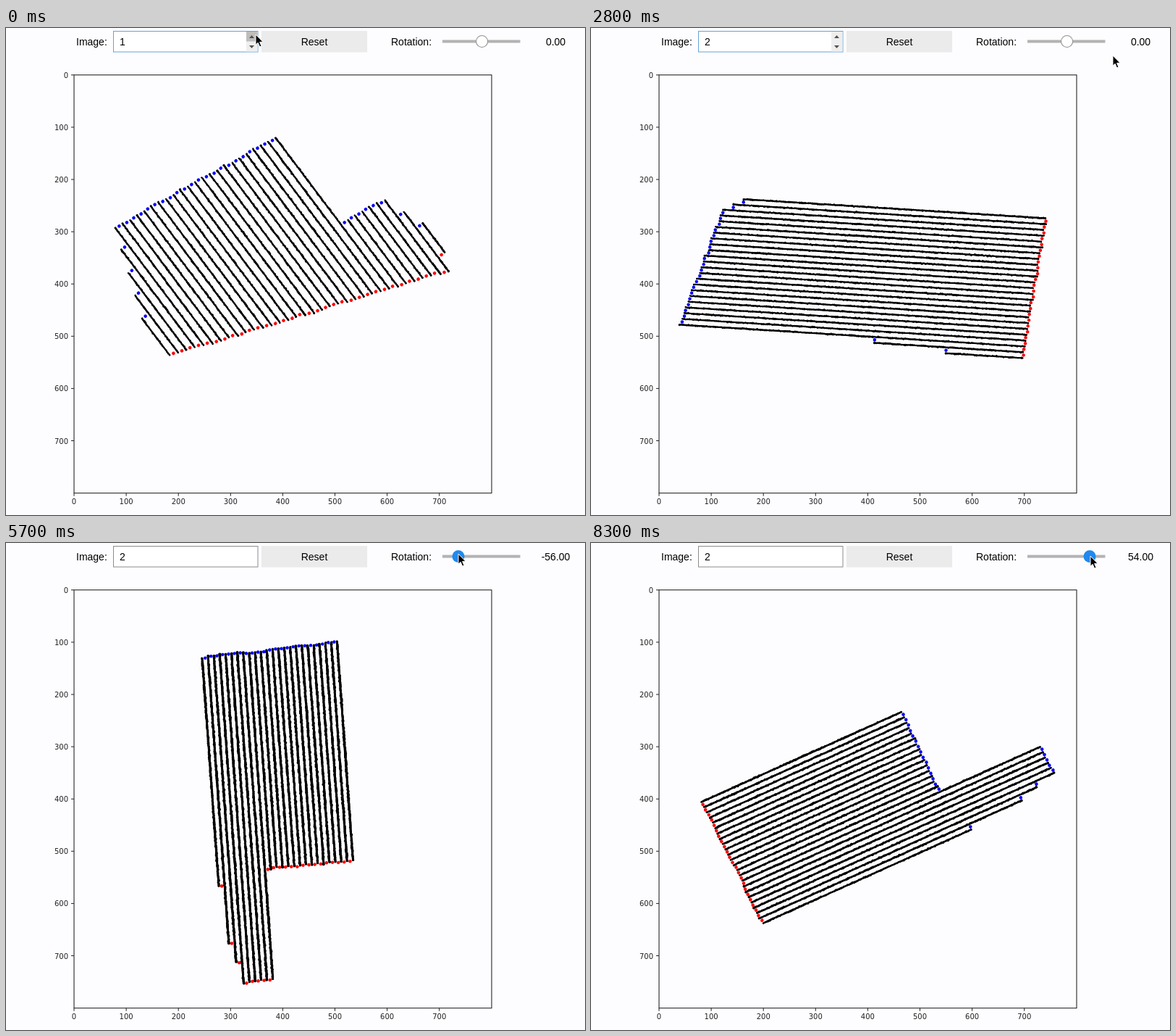
Animation, 800 px wide and 672 px high, one loop 9900 ms. Source, as an HTML page with a canvas:

```html
<!DOCTYPE html>
<html lang="en">
<head>
<meta charset="utf-8">
<title>Line rotation viewer</title>
<style>
  html, body { margin: 0; width: 100%; height: 100%; overflow: hidden; background: #fdfcfe; }
  canvas { display: block; }
</style>
</head>
<body>
<canvas id="stage" width="800" height="672"></canvas>
<script>
const ctx = document.getElementById('stage').getContext('2d');
const LOOP = 9900, STEP = 100;
const PLOT = { x: 94, y: 64.8, size: 577, unit: 72.1 };
const PRESS = 4000, SLIDER_ZERO = 658, DEGREES_PER_PIXEL = 1.69;

// Parallel lines, evenly spaced; starts and ends follow
// [line index, position] key points around the plot centre.
const FIELDS = [
  {
    angle: 53, first: -205, last: 184, count: 35,
    starts: [[0, 51], [2, -9], [7, -18], [8, -168], [30, -202], [34, -79]],
    ends: [[0, 101], [1, 124], [34, -14]]
  },
  {
    angle: 3.6, first: -106, last: 88.5, count: 25,
    starts: [[0, -177], [2, -206], [22, -256], [23, 15], [24, 114]],
    ends: [[0, 241], [24, 220]]
  },
  {
    angle: 29.83, first: -90.5, last: 97, count: 24,
    starts: [[0, -210], [23, -203]],
    ends: [[0, 93], [14, 95], [15, 247], [20, 249], [22, 195], [23, 114]]
  }
];

const VIEWS = [
  { from: 0, field: 0, rotation: 0, width: 2.8 },
  { from: 700, field: 1, rotation: 0, width: 2.8 },
  { from: 3000, field: 2, rotation: 0, width: 2.6 },
  { from: 5700, field: 2, rotation: 56, width: 3.7 },
  { from: 8200, field: 2, rotation: -54, width: 3.1, swap: true }
];

// [time, x, y]
const CURSOR = [
  [1600, 345, 9], [2300, 788, 30], [2700, 721, 38], [2900, 721, 38], [3800, SLIDER_ZERO, 15],
  [PRESS, SLIDER_ZERO, 15], [4200, 625, 15], [6200, 625, 15], [6900, 690, 18]
];

function interpolate(keys, x, column = 1) {
  const next = keys.findIndex(k => k[0] >= x);
  if (next < 0) return keys[keys.length - 1][column];
  if (next === 0) return keys[0][column];
  const a = keys[next - 1], b = keys[next];
  return a[column] + (b[column] - a[column]) * (x - a[0]) / (b[0] - a[0]);
}

function seededNoise(seed) {
  return () => {
    seed = (seed * 16807) % 2147483647;
    return seed / 2147483647 * 2 - 1;
  };
}

function box(x, y, w, h, fill, stroke) {
  if (fill) { ctx.fillStyle = fill; ctx.fillRect(x, y, w, h); }
  if (stroke) { ctx.strokeStyle = stroke; ctx.lineWidth = 1; ctx.strokeRect(x, y, w, h); }
}

function disc(x, y, r, fill) {
  ctx.fillStyle = fill;
  ctx.beginPath();
  ctx.arc(x, y, r, 0, 7);
  ctx.fill();
}

function polygon(points, fill) {
  ctx.fillStyle = fill;
  ctx.beginPath();
  points.forEach(p => ctx.lineTo(...p));
  ctx.closePath();
  ctx.fill();
}

function label(text, x, y, align) {
  ctx.textAlign = align;
  ctx.fillText(text, x, y);
}

function drawAxes() {
  const { x: left, y: top, size, unit } = PLOT;
  box(left, top, size, size, null, '#111');
  ctx.font = '10px "DejaVu Sans", sans-serif';
  for (let i = 0; i < 8; i++) {
    const x = left + i * unit, y = top + i * unit;
    box(x - 0.5, top + size, 1, 4, '#222');
    box(left - 4, y - 0.5, 4, 1, '#222');
    label(i * 100, x, 657, 'center');
    label(i * 100, 86, y + 4, 'right');
  }
}

function drawRoughLine({ from, to, y }, width, noise) {
  ctx.lineWidth = width * 0.75;
  ctx.beginPath();
  ctx.moveTo(from, y);
  ctx.lineTo(to, y);
  ctx.stroke();
  for (let x = from; x <= to; x += 2.5) {
    disc(x, y + noise() * 0.45, width / 2 + noise() * 0.35, '#000');
  }
}

function drawField({ field, rotation, width, swap }) {
  const { angle, first, last, count, starts, ends } = FIELDS[field];
  const noise = seededNoise(411 + field);
  const lines = Array.from({ length: count }, (_, i) => ({
    from: interpolate(starts, i) + noise() * 1.5,
    to: interpolate(ends, i) + noise() * 1.5,
    y: first + (last - first) * i / (count - 1)
  }));
  const [startColor, endColor] = swap ? ['#f00', '#00f'] : ['#00f', '#f00'];
  ctx.save();
  ctx.translate(PLOT.x + PLOT.size / 2, PLOT.y + PLOT.size / 2);
  ctx.rotate((angle + rotation) * Math.PI / 180);
  ctx.strokeStyle = '#000';
  lines.forEach(line => drawRoughLine(line, width, noise));
  // A marker sits in each gap, at the end of the shorter neighbour.
  lines.slice(1).forEach((line, i) => {
    const above = lines[i], y = (line.y + above.y) / 2;
    disc(Math.max(line.from, above.from), y, 2.3, startColor);
    disc(Math.min(line.to, above.to), y, 2.3, endColor);
  });
  ctx.restore();
}

function drawInput(t) {
  const focused = t < PRESS;
  box(148.5, 4.5, 199.5, 28.5, '#fff', focused ? '#62a4d8' : '#8c8c8c');
  if (!focused) return;
  box(332, 5, 15.5, 27.5, '#eee');
  if (t < 1800) box(332, 5, 15.5, 13.5, '#bdbdbd');
  polygon([[336, 14], [343, 14], [339.5, 10]], '#505050');
  polygon([[336, 24], [343, 24], [339.5, 28]], '#505050');
  if ((t + 800) % 1000 < 500) box(165, 11, 1, 16, '#000');
}

function drawSlider(value, active) {
  const x = 657.6 + value * 0.582;
  box(603, 16.5, 107.5, 4, '#b3b3b3');
  disc(x, 18.5, 8.5, active ? '#1e88e5' : '#8f8f8f');
  disc(x, 18.5, 7.5, active ? '#2189ee' : '#fff');
}

function drawControls(t, cursorX) {
  const active = t >= PRESS;
  const value = active ? Math.round((cursorX - SLIDER_ZERO) * DEGREES_PER_PIXEL) : 0;
  drawInput(t);
  box(353, 4, 146, 29.5, '#ebebeb');
  drawSlider(value, active);
  ctx.font = '14px "Liberation Sans", Arial, sans-serif';
  ctx.fillStyle = '#000';
  label('Image:', 97, 23.5, 'left');
  label(t < 1500 ? '1' : '2', 157, 23.5, 'left');
  label('Reset', 426, 23.5, 'center');
  label('Rotation:', 532, 23.5, 'left');
  label(value.toFixed(2), 759.5, 23.5, 'center');
}

function drawCursor(x, y) {
  ctx.save();
  ctx.translate(x, y);
  polygon([[0, 0], [0, 14.2], [3.2, 11.3], [5.6, 17], [8, 16], [5.6, 10.4], [10, 10.2]], '#000');
  ctx.strokeStyle = '#fff';
  ctx.lineWidth = 1;
  ctx.stroke();
  ctx.restore();
}

function draw(t) {
  const cursorX = interpolate(CURSOR, t, 1), cursorY = interpolate(CURSOR, t, 2);
  box(0, 0, 800, 672, '#fdfcfe');
  ctx.fillStyle = '#222';
  drawAxes();
  drawField(VIEWS.filter(v => v.from <= t).pop());
  drawControls(t, cursorX);
  drawCursor(cursorX, cursorY);
}

const begin = performance.now();
let shown = -1;
function tick() {
  const t = Math.floor((performance.now() - begin) % LOOP / STEP) * STEP;
  if (t !== shown) draw(shown = t);
  requestAnimationFrame(tick);
}
tick();
</script>
</body>
</html>
```
